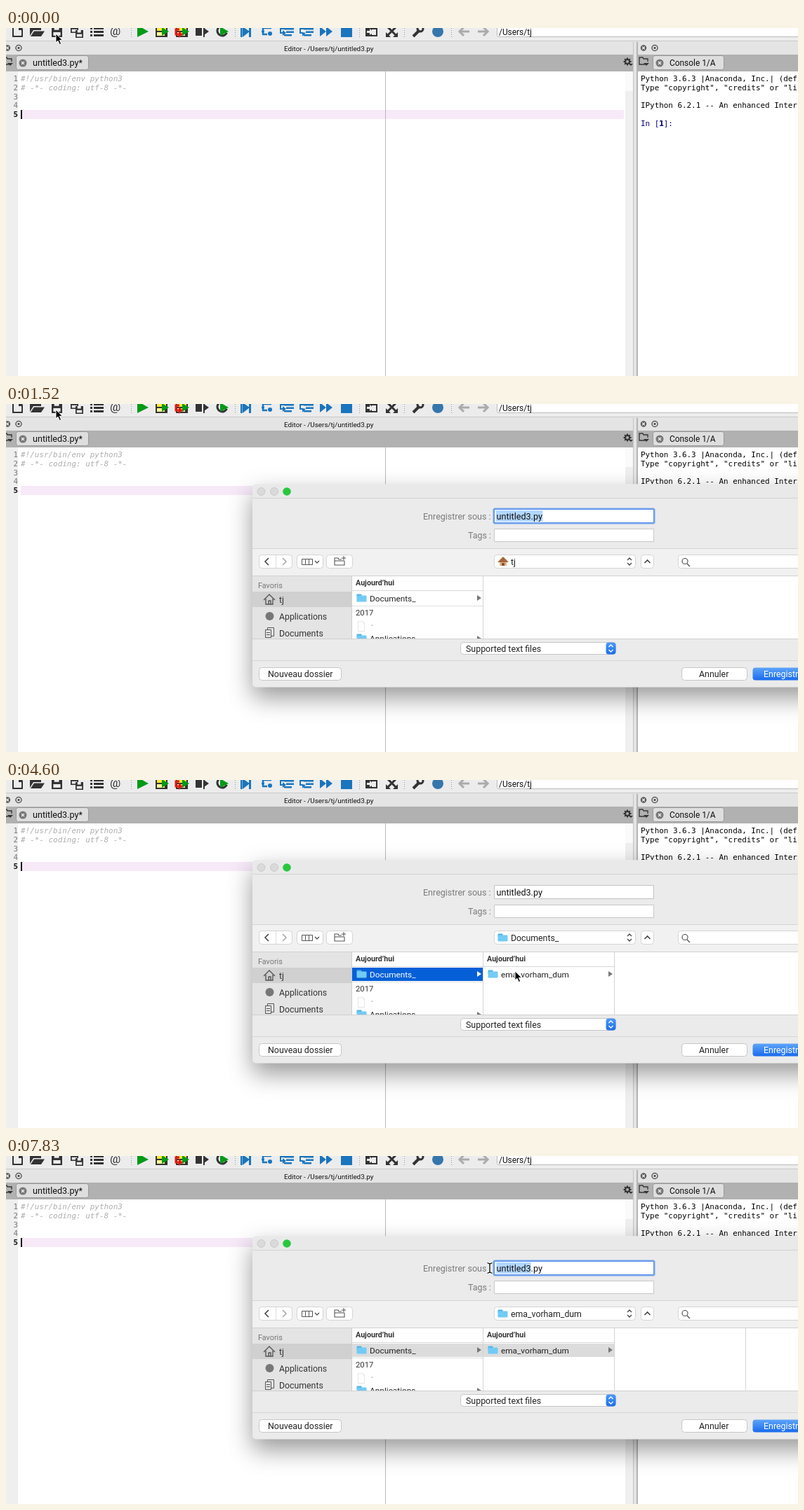
Recreate the animation shown at these times as an HTML page with a canvas. Size 1128 px wide and 497 px high, loop 8000 ms.

```html
<!DOCTYPE html>
<html lang="fr">
<head>
<meta charset="utf-8">
<title>Enregistrer un script</title>
<style>
html, body { margin: 0; width: 100%; height: 100%; overflow: hidden; background: #fff; }
canvas { display: block; }
</style>
</head>
<body>
<canvas id="stage" width="1128" height="497"></canvas>
<script>
const LOOP = 8000;
const UI = 'Roboto, sans-serif', MONO = '"DejaVu Sans Mono", monospace';
const DARK = '#333', BLUE = '#1975bf', GREEN = '#009a16';
const USER = 'tj', FOLDER = 'ema_vorham_dum', FILE = 'untitled3.py';
const screen = document.getElementById('stage').getContext('2d');
const layer = document.createElement('canvas');
layer.width = 1200;
layer.height = 497;
const sheet = layer.getContext('2d');
let g = screen;

// Drawing helpers
function rect(x, y, w, h, fill) {
  g.fillStyle = fill;
  g.fillRect(x, y, w, h);
}
function box(x, y, w, h, fill, border, r = 3) {
  g.beginPath();
  g.roundRect(x + .5, y + .5, w - 1, h - 1, r);
  g.fillStyle = fill;
  g.fill();
  if (border) {
    g.strokeStyle = border;
    g.lineWidth = 1;
    g.stroke();
  }
}
function trace(p) {
  g.beginPath();
  for (let i = 0; i < p.length; i += 2) g.lineTo(p[i], p[i + 1]);
}
function poly(fill, ...p) {
  trace(p);
  g.fillStyle = fill;
  g.fill();
}
function line(color, width, ...p) {
  trace(p);
  g.strokeStyle = color;
  g.lineWidth = width;
  g.stroke();
}
function disc(x, y, r, fill, border, width = 1) {
  g.beginPath();
  g.arc(x, y, r, 0, 7);
  if (fill) {
    g.fillStyle = fill;
    g.fill();
  }
  if (border) {
    g.strokeStyle = border;
    g.lineWidth = width;
    g.stroke();
  }
}
function text(s, x, y, size = 12.4, color = '#222', font = UI, style = '') {
  g.font = `${style} ${size}px ${font}`;
  g.fillStyle = color;
  g.fillText(s, x, y);
}
function dots(x) {
  for (let y = 0; y < 14; y += 3) rect(x, y, 1, 1, '#999');
}

// Main window
function fileIcon(x, fill) {
  poly(fill, x, -3, x + 11, -3, x + 15, 1, x + 15, 13, x, 13);
  poly('#ececec', x + 2, -3, x + 9, -3, x + 9, 3, x + 13, 3, x + 13, 11, x + 2, 11);
}
function saveIcon(x, y, s, fill) {
  rect(x, y, s, s, fill);
  rect(x + s * .25, y, s * .45, s * .32, '#ececec');
  rect(x + s * .16, y + s * .53, s * .68, s * .33, '#ececec');
}
function cellIcon(x) {
  rect(x, -3, 17, 16, DARK);
  rect(x + 2, 0, 13, 4, '#f7e830');
  rect(x + 2, 6, 11, 5, '#fff799');
  poly(GREEN, x + 9, -1, x + 19, 5, x + 9, 11);
}
function stepIcon(x, up) {
  rect(x + 6, 0, 14, 2.5, BLUE);
  rect(x + 9, 4.5, 11, 2.5, BLUE);
  rect(x + 6, 9, 11, 2.5, BLUE);
  line(BLUE, 2, x + 6, 1, x + 1, 1, x + 1, 7, x + 5, 7);
  poly(BLUE, x + 4, up ? 12 : 3, x + 9, 7, x + 4, up ? 6 : 11);
}
function toolbar(t) {
  rect(0, 0, 1128, 20, '#ececec');
  rect(0, 18, 1128, 1, '#c8c8c8');
  fileIcon(9, DARK);
  poly(DARK, 34, -2, 41, -2, 43, 0, 50, 0, 50, 3, 39, 3, 34, 11);
  poly(DARK, 40, 4.5, 55, 4.5, 50, 12, 35, 12);
  saveIcon(65, -2, 15, t >= 860 && t < 1040 ? '#000' : DARK);
  saveIcon(92, -4, 11, DARK);
  saveIcon(99, 3, 11, DARK);
  for (let y = 0; y < 12; y += 5) {
    rect(120, y - 1, 3, 3, DARK);
    rect(125, y - 1, 14, 3, DARK);
  }
  text('@', 148, 10, 17, DARK);
  [178, 326, 503, 567, 634].forEach(dots);
  poly(GREEN, 187, -4, 203, 5, 187, 13);
  cellIcon(213);
  cellIcon(242);
  line('#e01818', 3, 247, 9, 242, 9, 242, 2, 247, 2);
  poly('#e01818', 246, 4, 252, 9, 246, 14);
  rect(270, 0, 9, 11, DARK);
  rect(281, -2, 2, 15, DARK);
  poly(DARK, 282, 0, 289, 5, 282, 10);
  g.beginPath();
  g.arc(308, 4, 7, .4, 5);
  g.strokeStyle = DARK;
  g.lineWidth = 3;
  g.stroke();
  poly(GREEN, 305, -2, 317, 5, 305, 11);

  rect(334, -2, 2.5, 15, BLUE);
  poly(BLUE, 337, -2, 347, 5, 337, 13);
  rect(346, -2, 3, 15, BLUE);
  line(BLUE, 2.5, 378, 0, 366, 0, 366, 9, 372, 9);
  disc(376, 8, 3, BLUE);
  disc(366, 5, 2, BLUE);
  stepIcon(390, false);
  stepIcon(418, true);
  poly(BLUE, 447, -2, 456, 5, 447, 12);
  poly(BLUE, 456, -2, 465, 5, 456, 12);
  rect(477, -2, 16, 15, BLUE);

  rect(512, -2, 17, 14, DARK);
  rect(521, 2, 6, 8, '#ececec');
  poly('#ececec', 514, 4, 518, 4, 518, 1, 524, 6, 518, 10, 518, 7, 514, 7);
  line(DARK, 3, 543, -2, 556, 11);
  line(DARK, 3, 556, -2, 543, 11);
  poly(DARK, 541, 13, 541, 6, 548, 13);
  poly(DARK, 558, 13, 558, 6, 551, 13);
  line(DARK, 4, 580, 12, 589, 3);
  disc(590, 1, 4, null, DARK, 3);
  disc(615, 5, 8, '#3776ab');
  for (const [x, d] of [[645, 1], [687, -1]]) {
    line('#aaa', 3, x + 7 * d, -1, x + d, 5, x + 7 * d, 11);
    line('#aaa', 3, x + d, 5, x + 15 * d, 5);
  }
  box(699, -5, 440, 18, '#fff', '#bbb', 2);
  text('/Users/' + USER, 702, 10, 11.9, '#111');
}
function paneButtons(x) {
  disc(x, 28.5, 4.2, '#555');
  line('#eee', 1.2, x - 2, 26.5, x + 2, 30.5);
  line('#eee', 1.2, x + 2, 26.5, x - 2, 30.5);
  disc(x + 16, 28.5, 4, '#eee', '#555', 1.5);
  rect(x + 14.5, 27, 3, 3, '#555');
}
function tab(x, w, label, size) {
  box(x, 39, w, 21, '#dedede', '#999');
  disc(x + 10, 50, 5.5, '#777');
  line('#eee', 1.3, x + 8, 48, x + 12, 52);
  line('#eee', 1.3, x + 12, 48, x + 8, 52);
  text(label, x + 24, 54, size, '#111');
}
function browseIcon(x) {
  line(DARK, 1.3, x + 8, 52, x, 52, x, 42, x + 5, 42, x + 6, 44, x + 12, 44, x + 12, 48);
  poly(DARK, x + 6, 50, x + 14, 50, x + 10, 54);
}
function mainWindow(t) {
  rect(0, 0, 1128, 497, '#fff');
  toolbar(t);
  rect(0, 19, 1128, 19, '#e4e4e4');
  rect(0, 38, 1128, 24, '#b1b1b1');
  paneButtons(2);
  text(`Editor - /Users/${USER}/${FILE}`, 396, 33, 9.9, '#111');
  browseIcon(-4);
  tab(14, 104, FILE + '*', 12.6);
  for (let i = 0; i < 8; i++) {
    const c = Math.cos(i * Math.PI / 4), s = Math.sin(i * Math.PI / 4);
    line(DARK, 2, 885 + c * 3, 48 + s * 3, 885 + c * 5.5, 48 + s * 5.5);
  }
  disc(885, 48, 3, null, DARK, 2);
  poly(DARK, 887, 51, 893, 51, 890, 54);

  rect(0, 62, 17, 435, '#efefef');
  rect(21, 117, 859, 13, '#f8e9f9');
  for (let i = 1; i < 6; i++)
    text(i, 10.5, 63.3 + i * 12.75, 10.9, i === 5 ? '#111' : '#777', MONO, i === 5 ? 'bold' : '');
  text('#!/usr/bin/env python3', 21, 76, 10.95, '#adadad', MONO, 'italic');
  text('# -*- coding: utf-8 -*-', 21, 88.5, 10.95, '#adadad', MONO, 'italic');
  rect(540, 62, 1, 435, '#b8b8b8');
  rect(882, 62, 11, 435, '#efefef');
  rect(882, 62, 11, 28, '#fafafa');

  rect(893, 20, 7, 477, '#e4e4e4');
  rect(893, 20, 1, 477, '#c4c4c4');
  rect(898, 20, 2, 477, '#b4b4b4');
  paneButtons(908);
  browseIcon(902);
  tab(921, 102, 'Console 1/A', 11.9);
  text('Python 3.6.3 |Anaconda, Inc.| (def', 904, 76, 10.9, '#000', MONO);
  text('Type "copyright", "credits" or "li', 904, 88.5, 10.9, '#000', MONO);
  text('IPython 6.2.1 -- An enhanced Inter', 904, 114, 10.9, '#000', MONO);
  text('In [1]:', 904, 139.5, 10.9, '#000080', MONO);
  text('    1', 904, 139.5, 10.9, '#000080', MONO, 'bold');
}

// Save dialog
function house(x, y, color) {
  line(color, 1.4, x, y + 8, x + 8, y, x + 16, y + 8);
  line(color, 1.4, x + 3, y + 6, x + 3, y + 14, x + 13, y + 14, x + 13, y + 6);
  line(color, 1.4, x + 7, y + 14, x + 7, y + 9, x + 10, y + 9, x + 10, y + 14);
}
function folder(x, y) {
  box(x, y, 8, 6, '#4fb2e4', null, 1);
  box(x, y + 2, 15, 10, '#72cbf5', null, 1);
}
function stepper(x, color) {
  line(color, 1.4, x - 3, 347, x, 344, x + 3, 347);
  line(color, 1.4, x - 3, 351, x, 354, x + 3, 351);
}
function row(x, label, state) {
  if (state) rect(x, 268, 186, 19, state === 'on' ? '#0560d8' : '#dcdcdc');
  folder(x + 6, 271);
  const on = state === 'on';
  text(label, x + 25, 281.5, 11.8, on ? '#fff' : '#222');
  poly(on ? '#fff' : '#777', x + 178, 273, x + 184, 277, x + 178, 281);
}
function column(x, label, state) {
  text("Aujourd’hui", x + 5, 259, 10.7, '#333', UI, 'bold');
  rect(x, 266, 186, 1, '#d8d8d8');
  row(x, label, state);
  rect(x + 186, 246, 1, 89, '#d4d4d4');
}
function button(x, w, label, lx, fill = '#fff', color = '#222') {
  box(x, 376, w, 19, fill, fill === '#fff' ? '#c6c6c6' : null, 4);
  text(label, lx, 390, 12.4, color);
}
function nameField(t, x) {
  const focus = t < 3260 || t >= 7340;
  if (focus) box(693, 148, 232, 24, '#75a5f0', null, 3);
  box(695, 150, 228, 20, '#fff', focus ? '#5a91e8' : '#c2c2c2', 0);
  g.font = `12.6px ${UI}`;
  if (t < 3260) rect(698, 152, g.measureText(FILE).width + 1, 16, '#b3d7ff');
  if (t >= 7340) {
    const at = n => 698.5 + g.measureText(FILE.slice(0, n)).width;
    let from = 0;
    while (from < 9 && at(from) < x - 2) from++;
    rect(at(from), 152, at(9) - at(from), 16, '#b3d7ff');
  }
  text(FILE, 698.5, 164.5, 12.6, '#111');
}
function dialog(t, x) {
  const opened = t >= 3260, deeper = t >= 4780;
  g = sheet;
  g.clearRect(0, 0, 1200, 497);
  g.save();
  g.beginPath();
  g.roundRect(351, 114.5, 816, 290, 5);
  g.clip();
  rect(351, 114, 816, 291, '#ebebeb');
  rect(351, 114, 816, 20, '#e9e9e9');
  rect(351, 134, 816, 1, '#d3d3d3');
  disc(363.5, 125, 5.5, '#dadada', '#c9c9c9');
  disc(382, 125, 5.5, '#dadada', '#c9c9c9');
  disc(400, 125, 5.8, '#29c73f');
  text('Enregistrer sous :', 594, 164.5, 12.5, '#7b7b7b');
  text('Tags :', 658, 192, 12.4, '#7b7b7b');
  nameField(t, x);
  box(695, 178, 228, 19, '#fff', '#c8c8c8', 0);

  rect(351, 206, 816, 1, '#d3d3d3');
  rect(351, 207, 816, 38, '#f1f1f1');
  for (const [bx, w] of [[360, 48], [414, 38], [456, 38], [695, 202], [904, 19], [957, 199]])
    box(bx, 215, w, 20, '#fff', '#d4d4d4', 4);
  rect(384, 216, 1, 18, '#ddd');
  line(t >= 1640 && !opened ? '#aaa' : '#444', 1.6, 374, 220, 369, 225, 374, 230);
  line('#aaa', 1.6, 394, 220, 399, 225, 394, 230);
  for (const cx of [421, 426, 431]) box(cx, 221, 6, 9, '#fff', '#555', 0);
  line('#555', 1.4, 440, 224, 443, 227, 446, 224);
  line('#555', 1.1, 482, 224, 482, 230, 468, 230, 468, 220, 473, 220, 474, 222, 478, 222);
  line('#555', 1, 468, 224, 482, 224);
  line('#555', 1, 478, 220, 484, 220);
  line('#555', 1, 481, 217, 481, 223);
  if (opened) folder(700, 219);
  else {
    rect(703, 225, 10, 6, '#d8b98f');
    poly('#a8643c', 700, 226, 708, 218, 716, 226);
    rect(706, 227, 4, 4, '#8e4f30');
  }
  text(deeper ? FOLDER : opened ? 'Documents_' : USER, 719, 229.7, 12.3);
  g.save();
  g.translate(0, -124);
  stepper(888, '#444');
  g.restore();
  line('#444', 1.6, 909.5, 227, 913.5, 223, 917.5, 227);
  disc(967, 224.5, 4, null, '#555', 1.2);
  line('#555', 1.4, 970, 228, 974, 232);

  g.save();
  g.beginPath();
  g.rect(351, 245, 816, 90);
  g.clip();
  rect(351, 245, 816, 90, '#fff');
  rect(351, 245, 141, 90, '#e4e4e4');
  rect(351, 268, 141, 22, '#d0d0d0');
  rect(492, 245, 1, 90, '#cfcfcf');
  rect(351, 245, 816, 1, '#d0d0d0');
  text('Favoris', 359, 263, 10.8, '#777');
  house(367, 272, '#555');
  text(USER, 389, 283.5, 12.4, '#333');
  disc(375.5, 303, 6, '#777');
  text('Applications', 389, 307.5, 12.3, '#333');
  box(372, 319, 10, 13, '#e4e4e4', '#555', 0);
  box(369, 322, 9, 12, '#e4e4e4', '#555', 0);
  rect(371, 326, 5, 1, '#555');
  rect(371, 329, 5, 1, '#555');
  text('Documents', 389, 331.5, 12.3, '#333');

  column(493, 'Documents_', opened && (t < 5140 ? 'on' : 'off'));
  rect(493, 288, 186, 1, '#e0e0e0');
  text('2017', 498, 302, 11.3, '#333');
  poly('#e6e6e6', 501, 310, 508, 310, 511, 313, 511, 325, 501, 325);
  poly('#fff', 502, 311, 507, 311, 510, 314, 510, 324, 502, 324);
  rect(521, 315, 1, 2, '#aaa');
  folder(499, 328);
  text('Applications', 518, 339, 11.8);
  poly('#777', 671, 331, 677, 335, 671, 339);
  if (opened) column(680, FOLDER, deeper && (t < 7340 ? 'on' : 'off'));
  if (deeper) rect(1053, 246, 1, 89, '#d4d4d4');
  g.restore();

  rect(351, 335, 816, 1, '#d0d0d0');
  rect(351, 366, 816, 1, '#d6d6d6');
  box(647, 340, 222, 18, '#fff', '#c6c6c6', 4);
  const blue = g.createLinearGradient(0, 340, 0, 395);
  blue.addColorStop(0, '#4d9cf8');
  blue.addColorStop(.35, '#1769ee');
  blue.addColorStop(.65, '#61a7fa');
  blue.addColorStop(1, '#1769ee');
  box(854, 340, 15, 18, blue, null, 4);
  stepper(861.5, '#fff');
  text('Supported text files', 655, 354, 12.4);
  button(360, 118, 'Nouveau dossier', 373);
  button(962, 94, 'Annuler', 987);
  button(1063, 93, 'Enregistrer', 1079, blue, '#fff');
  g.restore();

  // The window grows from its centre while fading in
  g = screen;
  const scale = t < 1400 ? .55 : t < 1520 ? .759 : 1;
  g.save();
  g.globalAlpha = t < 1400 ? .4 : t < 1520 ? .9 : 1;
  g.shadowColor = 'rgba(0,0,0,.4)';
  g.shadowBlur = 34 * scale;
  g.shadowOffsetY = 15 * scale;
  g.translate(759, 259.3);
  g.scale(scale, scale);
  g.drawImage(layer, -759, -259.3);
  g.restore();
}

// Pointer: start, end, number of jumps, target x, y, sag
const moves = [
  [1930, 2690, 9, 559, 259, 0],
  [2810, 3080, 4, 557, 275, 0],
  [3950, 4690, 9, 727, 272, 14],
  [5140, 5220, 2, 735, 279, 0],
  [6240, 6620, 5, 748, 162, 0],
  [6980, 7070, 2, 748, 161, 0],
  [7340, 7830, 6, 689, 160, 0]
];
function pointerAt(t) {
  let x = 71, y = 8;
  for (const [from, to, n, tx, ty, sag] of moves) {
    if (t < from) break;
    const k = Math.min(n, Math.floor((t - from) / (to - from) * (n - 1) + 1.001)) / n;
    const p = k * k * k * (k * (6 * k - 15) + 10);
    x += (tx - x) * p;
    y += (ty - y) * p + sag * Math.sin(Math.PI * p);
  }
  return [x, y];
}
function pointer(x, y, beam) {
  g.save();
  g.translate(Math.round(x), Math.round(y));
  if (beam) {
    for (const [color, w] of [['#fff', 3], ['#000', 1.3]]) {
      line(color, w, 0, -6, 0, 6);
      line(color, w, -3.5, -7.5, 0, -6, 3.5, -7.5);
      line(color, w, -3.5, 7.5, 0, 6, 3.5, 7.5);
    }
  } else {
    poly('#000', 0, 0, 0, 13, 3, 10.3, 5.3, 15.5, 7.6, 14.5, 5.4, 9.4, 9.5, 9.4);
    g.closePath();
    g.strokeStyle = '#fff';
    g.lineWidth = 1;
    g.stroke();
  }
  g.restore();
}

const blinks = [180, 690, 1310, 1640, 2130, 2640, 3080, 3650, 4130, 4600, 5140, 5610, 6060, 6620, 7070, 7590];

function tooltip(t) {
  if (t < 510 || t >= 860) return;
  g.globalAlpha = t < 780 ? 1 : .5;
  box(74, 22, 87, 22, '#f2f2f2', '#c8c8c8', 0);
  text('Save file', 91, 37, 12.4);
  g.globalAlpha = 1;
}

function draw(now) {
  const t = now % LOOP;
  const [x, y] = pointerAt(t);
  mainWindow(t);
  if (blinks.filter(b => b <= t).length % 2 === 0) rect(21, 117, 2, 13, '#000');
  tooltip(t);
  if (t >= 1310) dialog(t, x);
  pointer(x, y, t > 6240 && y < 198);
  requestAnimationFrame(draw);
}
requestAnimationFrame(draw);
</script>
</body>
</html>
```
